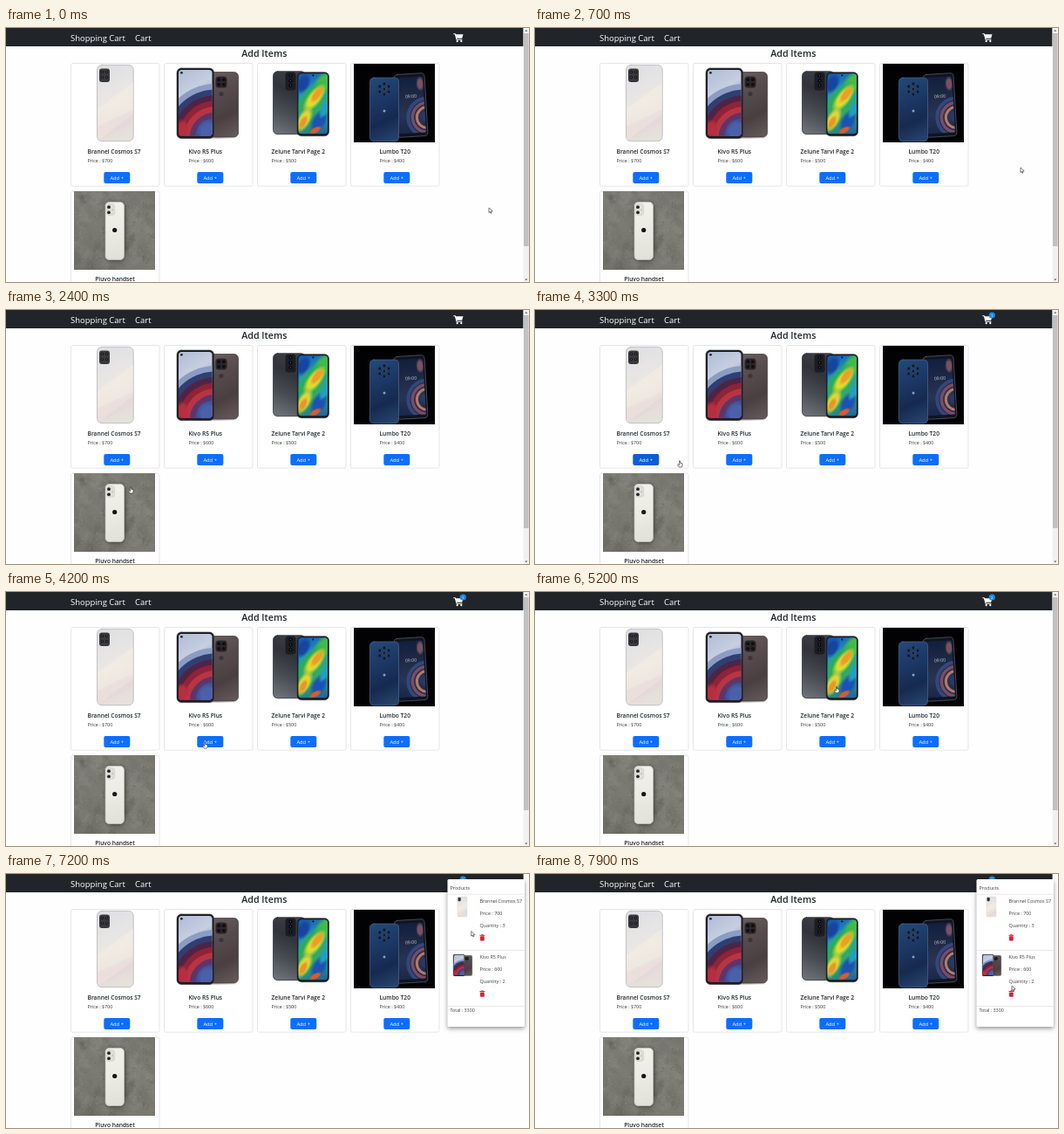
An HTML page with a canvas that plays this animation: 600 px wide and 291 px high, repeating every 8000 ms.

```html
<!DOCTYPE html>
<html lang="en">
<head>
<meta charset="utf-8">
<title>Shopping Cart</title>
<style>
html, body { margin: 0; width: 100%; height: 100%; overflow: hidden; background: #fefefe; }
canvas { display: block; width: 600px; height: 291px; }
</style>
</head>
<body>
<canvas id="stage" width="600" height="291"></canvas>
<script>
const g = document.getElementById('stage').getContext('2d');
const LOOP = 8000, STEP = 100;
const FONT = '"Open Sans", "Noto Sans", sans-serif';
const BLUE = '#0d6efd', LINE = '#dfe0e2', INK = '#212529';

const items = [
  { name: 'Brannel Cosmos S7', price: 700, cx: 125, left: 93.5, draw: silverPhone },
  { name: 'Kivo R5 Plus', price: 600, cx: 232, left: 209.5, draw: wavePhone },
  { name: 'Zelune Tarvi Page 2', price: 500, cx: 339, left: 304.5, draw: swirlPhone },
  { name: 'Lumbo T20', price: 400, cx: 446, left: 428.5, draw: navyPhone }
];

// Pointer path: time, x, y
const path = [
  [0, 554, 206], [700, 557, 160], [1800, 557, 160], [2400, 143, 203],
  [2700, 127, 171], [3100, 128, 172], [3300, 166, 173], [4400, 234, 172],
  [4900, 234, 172], [5600, 518, 11], [6600, 518, 11], [7100, 533, 62],
  [7800, 547, 128], [8000, 547, 128]
];

function smooth(p) { return p * p * (3 - 2 * p); }
function clamp(p) { return Math.max(0, Math.min(1, p)); }

function pointerAt(t) {
  const i = Math.max(1, path.findIndex(k => k[0] >= t));
  const a = path[i - 1], b = path[i];
  const p = smooth(clamp((t - a[0]) / (b[0] - a[0])));
  return { x: a[1] + (b[1] - a[1]) * p, y: a[2] + (b[2] - a[2]) * p };
}

function text(str, x, y, size, color = INK, weight = 400, align = 'left') {
  g.font = `${weight} ${size}px ${FONT}`;
  g.textAlign = align;
  g.fillStyle = color;
  g.fillText(str, x, y);
}

function rect(x, y, w, h, color) {
  g.fillStyle = color;
  g.fillRect(x, y, w, h);
}

function round(x, y, w, h, r, fill, stroke, lw = 1) {
  g.beginPath();
  g.roundRect(x, y, w, h, r);
  if (fill) { g.fillStyle = fill; g.fill(); }
  if (stroke) { g.strokeStyle = stroke; g.lineWidth = lw; g.stroke(); }
}

function dot(x, y, r, color) {
  g.fillStyle = color;
  g.beginPath();
  g.arc(x, y, r, 0, 7);
  g.fill();
}

function poly(points, fill, stroke, lw = 0.6) {
  g.beginPath();
  points.forEach(([x, y]) => g.lineTo(x, y));
  g.closePath();
  g.fillStyle = fill;
  g.fill();
  if (stroke) { g.strokeStyle = stroke; g.lineWidth = lw; g.stroke(); }
}

function blend(x0, y0, x1, y1, ...colors) {
  const gr = g.createLinearGradient(x0, y0, x1, y1);
  colors.forEach((c, i) => gr.addColorStop(i / (colors.length - 1), c));
  return gr;
}

function glow(x, y, r, color, sx = 1, sy = 1, turn = 0) {
  g.save();
  g.translate(x, y);
  g.rotate(turn);
  g.scale(sx, sy);
  const gr = g.createRadialGradient(0, 0, 0, 0, 0, r);
  gr.addColorStop(0, color);
  gr.addColorStop(0.55, color);
  gr.addColorStop(1, color + '00');
  dot(0, 0, r, gr);
  g.restore();
}

function inside(x, y, w, h, r, paint) {
  g.save();
  g.beginPath();
  g.roundRect(x, y, w, h, r);
  g.clip();
  paint();
  g.restore();
}

function ring(x, y, r, color, lw) {
  g.strokeStyle = color;
  g.lineWidth = lw;
  g.beginPath();
  g.arc(x, y, r, 0, 7);
  g.stroke();
}

function silverPhone() {
  round(104.5, 42.3, 41.7, 87.4, 5.5,
    blend(106, 44, 144, 128, '#dedee0', '#e5e4e5', '#ebe7e3', '#e4dcdc', '#e6e2d8'), '#bcbcbf', 0.9);
  inside(105, 42.8, 40.7, 86.4, 5, () => {
    poly([[104, 93], [147, 62], [147, 98], [104, 130]], 'rgba(247,240,228,.5)');
    poly([[104, 113], [147, 93], [147, 108], [104, 130]], 'rgba(229,210,216,.35)');
  });
  round(107, 46.5, 12, 15.5, 3, '#38383d');
  [[110.4, 50.4], [115.6, 50.4], [110.4, 56.6], [115.6, 56.6]].forEach(p => {
    dot(p[0], p[1], 1.7, '#17181c');
    dot(p[0], p[1], 0.6, '#5c6473');
  });
}

function wavePhone() {
  rect(199, 125, 68, 1.6, blend(199, 0, 267, 0, '#ffffff', '#b9b6b7', '#b9b6b7', '#ffffff'));
  round(229, 50.5, 37.5, 74.5, 5, blend(230, 50, 267, 124, '#6a5f60', '#574b4d', '#493f41', '#665a5c'), '#3c3537', 0.7);
  round(240.5, 55.5, 13, 13, 3.5, '#2a2527');
  [[244.2, 59.2], [249.8, 59.2], [244.2, 64.8], [249.8, 64.8]].forEach(p => dot(p[0], p[1], 1.9, '#0e0d10'));
  dot(247, 75.5, 2.6, '#3d3537');
  round(196, 46, 42.5, 80.5, 5, '#1b1c22', '#3b3b40', 0.6);
  inside(198, 48, 38.5, 75.5, 3.5, () => {
    rect(197, 47, 41, 78, blend(198, 48, 225, 95, '#aebdd6', '#c7cee0', '#7e8cb8'));
    const bands = ['#8c9cc4', '#303e72', '#4e2446', '#8f2337', '#b93443', '#5d3568', '#3b4f99', '#6379b8'];
    bands.forEach((color, i) => dot(240, 126, 62 - i * 6.5, color));
    glow(202, 116, 11, '#b52f40', 0.8, 1.1);
    glow(232, 118, 14, '#4a60a8');
  });
  dot(201.4, 51.2, 1.3, '#0b0c12');
}

function swirlPhone() {
  round(306.5, 49.7, 37, 72, 5, blend(308, 118, 340, 52, '#6c7077', '#484c53', '#303339', '#3d4148'), '#25282d', 0.7);
  round(320.5, 50.5, 12, 21, 3.5, '#1b1d22');
  [[326.5, 54.5], [326.5, 60.3], [326.5, 66]].forEach(p => {
    dot(p[0], p[1], 2.1, '#08090c');
    dot(p[0], p[1], 0.7, '#4b5665');
  });
  round(334, 50.7, 36.5, 73, 5, '#15171c', '#33363b', 0.6);
  inside(335.5, 52.2, 33.5, 69, 3.5, () => {
    rect(335, 51, 35, 72, blend(336, 52, 369, 122, '#1553b0', '#229ac8', '#35ac5c', '#1f5cab'));
    glow(341, 64, 10, '#17449f', 0.8, 1.3, 0.5);
    glow(364, 64, 13, '#43bb48', 0.8, 1.4, 0.6);
    glow(350, 82, 19, '#2bad57', 0.7, 1.35, 0.65);
    glow(354, 80, 14, '#dcdc2e', 0.6, 1.45, 0.65);
    glow(357, 76, 9, '#ee9d25', 0.55, 1.4, 0.65);
    glow(342, 105, 13, '#e0d436', 0.6, 1.3, 0.5);
    glow(341, 108, 7, '#e8952b', 0.6, 1.3, 0.5);
    glow(359, 107, 13, '#1c52b4', 0.7, 1.2, 0.5);
    glow(366, 93, 8, '#209fc4', 0.6, 1.6, 0.5);
    glow(355, 117, 6, '#dc5b2a', 1.4, 0.6, -0.5);
  });
  dot(352.3, 54.3, 1.1, '#0d0f14');
}

function navyPhone() {
  rect(399, 41, 93, 90, '#020204');
  g.save();
  g.translate(464.5, 88.5);
  g.rotate(-0.06);
  round(-17.5, -36, 35, 72, 4, '#10141f', '#596276', 0.7);
  inside(-15.5, -32.5, 31, 64.5, 1, () => {
    rect(-16, -33, 32, 66, blend(0, -32, 0, 32, '#13203d', '#1d2945', '#283455', '#1a2748'));
    ring(18, 15, 22, '#33477c', 4);
    ring(18, 15, 17, '#7a4c62', 3.5);
    ring(18, 15, 12, '#b87862', 3);
    glow(17, 14, 8, '#263a6b');
    glow(12, -24, 8, '#7b5060', 0.6, 1.1);
  });
  text('09:00', 0.5, -8.5, 5.2, '#c4cad8', 400, 'center');
  g.restore();
  round(417.5, 57, 33, 73, 4.5, blend(418, 57, 451, 129, '#234a78', '#1c3968', '#152a50', '#29466f'), '#4c6790', 0.7);
  for (let i = 0; i < 6; i++) {
    const a = i * Math.PI / 3 + Math.PI / 6;
    const x = 434 + 6 * Math.cos(a), y = 70 + 6 * Math.sin(a);
    dot(x, y, 2.2, '#0a1426');
    ring(x, y, 1.9, '#476288', 0.5);
  }
  dot(434, 70, 2.2, '#0a1426');
  ring(434, 70, 1.9, '#627a9c', 0.5);
  dot(434, 95, 1.5, '#8ca0bd');
}

function whitePhone() {
  inside(78, 187, 93, 90, 0, () => {
    rect(78, 187, 93, 90, blend(78, 277, 171, 187, '#6a6a62', '#787870', '#7e7d75', '#75746c'));
    let seed = 17;
    const rnd = () => (seed = seed * 16807 % 2147483647) / 2147483647;
    const spots = (n, size, strength) => {
      for (let i = 0; i < n; i++) {
        g.globalAlpha = strength * (0.3 + rnd());
        glow(78 + rnd() * 93, 187 + rnd() * 90, size * (0.3 + rnd()), rnd() > 0.5 ? '#a3a298' : '#4b4b44', 1.4, 0.8, rnd() * 3);
      }
    };
    spots(110, 7, 0.12);
    spots(600, 1.1, 0.22);
    g.globalAlpha = 1;
  });
  g.save();
  g.shadowColor = 'rgba(20,20,18,.65)';
  g.shadowBlur = 5;
  g.shadowOffsetX = 1;
  g.shadowOffsetY = 1;
  round(114, 199.5, 21.5, 66, 4.5, '#efefeb');
  g.restore();
  round(114, 199.5, 21.5, 66, 4.5, blend(114, 199, 136, 265, '#f3f3ed', '#ebebe4', '#e0e0d8'), '#bbbbb2', 0.7);
  round(115.2, 201.5, 9.5, 13, 3, '#dfdfd7', '#c8c8c0', 0.5);
  dot(118, 205.2, 1.9, '#24262a');
  dot(118, 211.3, 1.9, '#24262a');
  dot(122.3, 208.2, 0.8, '#b6b09c');
  dot(124.7, 231.5, 2.6, '#141414');
}

function cartIcon() {
  g.strokeStyle = '#fff';
  g.lineWidth = 1.1;
  g.lineCap = g.lineJoin = 'round';
  g.beginPath();
  [[513.7, 6.7], [515.3, 6.7], [517, 13.2], [523, 13.2]].forEach(p => g.lineTo(p[0], p[1]));
  g.stroke();
  poly([[515.5, 7.2], [524.5, 7.2], [523.2, 11.7], [516.7, 11.7]], '#fff');
  dot(517.7, 15.2, 1.1, '#fff');
  dot(522.3, 15.2, 1.1, '#fff');
}

function badge(count) {
  if (!count) return;
  dot(524.3, 6, 3.6, '#1f8ae6');
  text(count, 524.3, 7.6, 4.3, '#fff', 400, 'center');
}

function scrollbar() {
  rect(593.6, 0, 6.4, 291, '#f1f1f1');
  rect(594, 6, 5.6, 244, '#c1c1c1');
  poly([[595.3, 3.8], [596.8, 2], [598.3, 3.8]], '#505050');
  poly([[595.3, 287.5], [596.8, 289.3], [598.3, 287.5]], '#505050');
}

function button(cx, hot) {
  round(cx - 12.7, 165, 30, 13, 2, hot ? '#0b5ed7' : BLUE);
  text('Add +', cx + 2.2, 173.6, 5.8, '#fff', 400, 'center');
}

function page(hover, count, locked) {
  rect(0, 0, 600, 291, '#fefefe');
  rect(0, 0, 593.6, 21, INK);
  text('Shopping Cart', 74, 14.6, 9.5, '#fff');
  text('Cart', 148, 14.6, 9.5, '#fff');
  cartIcon();
  badge(count);
  text('Add Items', 296.3, 33, 10.7, INK, 600, 'center');
  items.forEach((it, i) => {
    round(it.cx - 50.5, 40.5, 101.5, 140.7, 2, '#fff', LINE, 0.8);
    it.draw();
    text(it.name, it.left, 143.8, 6.65, INK, 600);
    text('Price : $' + it.price, it.left, 154.4, 5.35, '#34383d');
    button(it.cx, i === hover);
  });
  round(74.5, 187, 101.5, 140.7, 2, '#fff', LINE, 0.8);
  whitePhone();
  text('Pluvo handset', 125, 289.6, 6.65, INK, 600, 'center');
  if (!locked) scrollbar();
}

function trash(x, y) {
  rect(x - 2.9, y - 3.2, 5.8, 1, '#dc1f35');
  rect(x - 1.1, y - 3.8, 2.2, 0.8, '#dc1f35');
  round(x - 2.4, y - 1.8, 4.8, 5.4, 0.8, '#dc1f35');
}

function row(it, qty, y, scale, dx, dy) {
  g.save();
  g.translate(dx, dy);
  g.scale(scale, scale);
  it.draw();
  g.restore();
  text(it.name, 543.5, y + 2, 5.4, '#3a3d41');
  text('Price : ' + it.price, 543.5, y + 16, 5.4, '#3a3d41');
  text('Quantity : ' + qty, 543.5, y + 30, 5.4, '#3a3d41');
  trash(546.4, y + 42.5);
}

function panel(p) {
  if (p <= 0) return;
  const s = 0.75 + 0.25 * p;
  g.save();
  g.globalAlpha = p;
  g.translate(521, 12);
  g.scale(s, s * s);
  g.translate(-521, -12);
  g.save();
  g.shadowColor = 'rgba(0,0,0,.42)';
  g.shadowBlur = 5;
  g.shadowOffsetY = 2;
  round(506.5, 6, 88.5, 169, 1.5, '#fff');
  g.restore();
  text('Products', 509.5, 17.7, 5.5, '#3a3d41');
  [22.8, 87, 151].forEach(y => rect(506.5, y, 88.5, 0.7, LINE));
  row(items[0], 3, 30.5, 0.265, 490.2, 14.7);
  row(items[1], 2, 94.7, 0.31, 452.2, 77.7);
  text('Total : 3300', 509.5, 158.3, 5.3, '#3a3d41');
  g.restore();
}

function pointer({ x, y }, hand) {
  g.save();
  g.translate(x, y);
  g.lineJoin = 'round';
  const shape = hand
    ? [[-0.6, 0], [0.6, 0], [0.7, 2.3], [3, 2.9], [3.2, 5], [2.3, 7], [-0.8, 7], [-2.5, 4.3], [-1.9, 3.6], [-0.7, 4.5]]
    : [[0, 0], [0, 5.5], [1.3, 4.4], [2.1, 6.3], [3, 5.9], [2.2, 4.1], [3.8, 4]];
  poly(shape, '#fff', '#222', 0.6);
  g.restore();
}

function onButton(p) {
  if (p.y < 165 || p.y > 178) return -1;
  return items.findIndex(it => p.x > it.cx - 13 && p.x < it.cx + 18);
}

function onCard(p) {
  const row1 = p.y > 40 && p.y < 181 && items.some(it => Math.abs(p.x - it.cx) < 50.5);
  return row1 || (p.y > 187 && p.x > 74 && p.x < 176);
}

function render(t) {
  const p = pointerAt(t);
  const count = t < 2800 ? 0 : t < 4700 ? 1 : 2;
  const open = smooth(clamp((t - 6600) / 300));
  page(onButton(pointerAt(Math.max(0, t - 150))), count, open > 0);
  panel(open);
  const onCart = p.y < 18 && p.x > 511;
  pointer(p, open === 0 && (onCart || onCard(p)));
}

let shown = -1;
function frame(now) {
  const t = Math.floor(now % LOOP / STEP) * STEP;
  if (t !== shown) render(shown = t);
  requestAnimationFrame(frame);
}
render(0);
requestAnimationFrame(frame);
</script>
</body>
</html>
```
